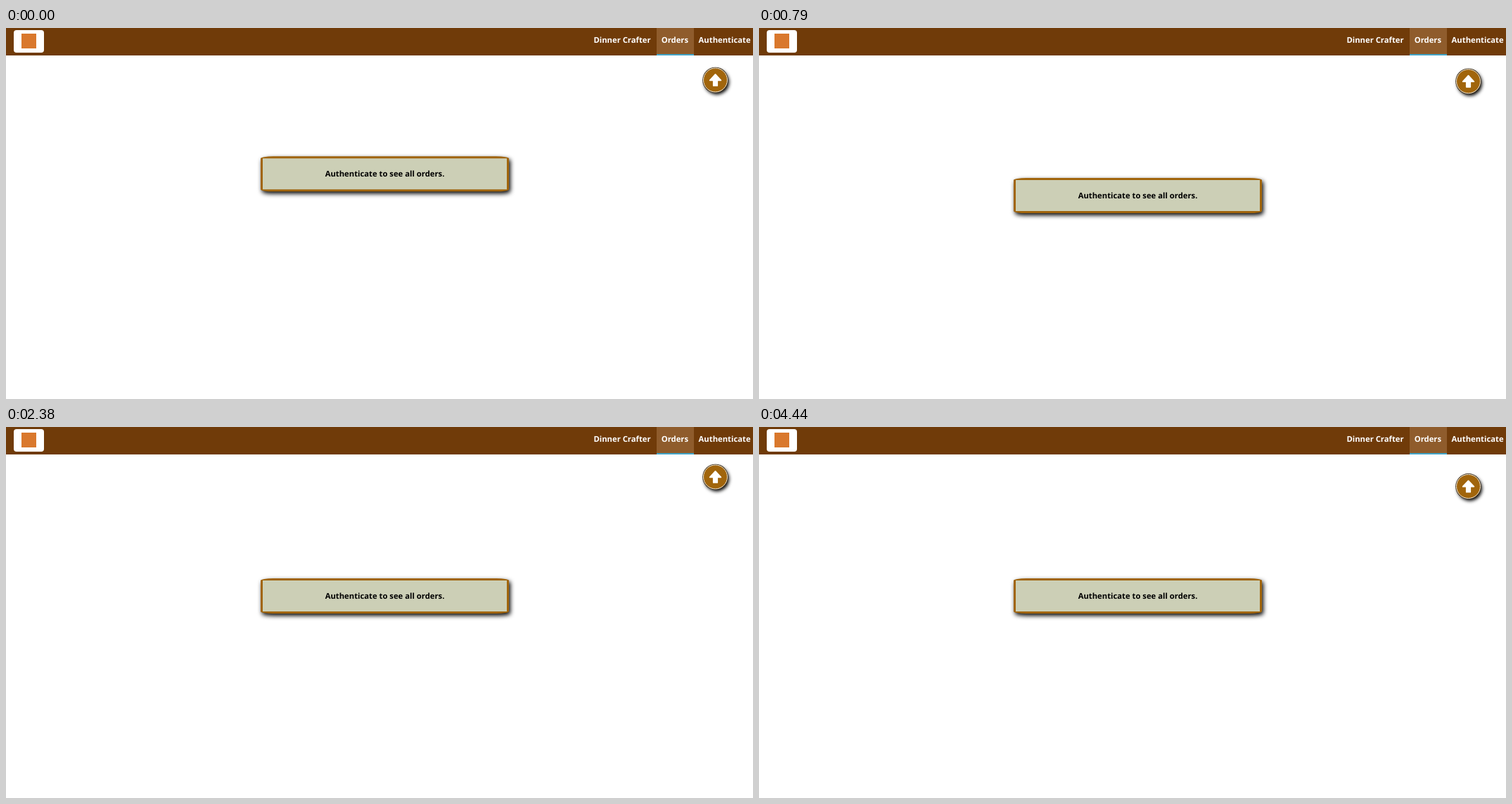
These frames come from a looping animation (1062 by 527 pixels, 4.48 s). An HTML page:

```html
<!DOCTYPE html>
<html lang="en">
<head>
<meta charset="utf-8">
<title>Orders</title>
<style>
  html, body { margin: 0; width: 100%; height: 100%; overflow: hidden; background: #fff; }
  body { position: relative; font: 700 11.27px "Open Sans", sans-serif; text-rendering: geometricPrecision; }
  header, .logo, .mark, nav span, .active, .card, .up { position: absolute; box-sizing: border-box; }
  header { left: 0; top: 0; width: 1062px; height: 39px; background: #703b09; }
  .logo { left: 11px; top: 3px; width: 43px; height: 31.5px; border-radius: 4px; background: #fff; }
  .mark { left: 11px; top: 5px; width: 21px; height: 21px; background: #d9782d; }
  .active { left: 925px; top: 0; width: 53px; height: 39px; background: #8f5c2c; border-bottom: 2px solid #40a4c8; }
  nav span { top: 0; line-height: 36px; color: #fff; white-space: nowrap; }
  .card {
    left: 362px; top: 215px; width: 353px; height: 50px;
    border: 3px solid #a1650c; border-radius: 18px / 3px; background: #cccfb6;
    box-shadow: 2px 3px 6px #000; color: #000; text-align: center; line-height: 45px;
  }
  .up {
    left: 991px; top: -17.5px; width: 35px; height: 35px;
    border: 1px solid #f4ead8; border-radius: 50%; background: #a1650c;
    box-shadow: 0 0 0 .8px #3a2a14, 2px 3px 5px #000;
  }
  .up svg { position: absolute; left: 0; top: 0; }
</style>
</head>
<body>
<header>
  <div class="logo"><div class="mark"></div></div>
  <nav>
    <div class="active"></div>
    <span style="left:835.4px">Dinner Crafter</span>
    <span style="left:931.7px">Orders</span>
    <span style="left:984.6px">Authenticate</span>
  </nav>
</header>
<div class="card">Authenticate to see all orders.</div>
<div class="up">
  <svg width="33" height="33" viewBox="-16.5 -16.5 33 33">
    <path d="M0-8 7.8.3H2.7V8H-2.7V.3H-7.8Z" fill="#fff" stroke="#fff" stroke-width="1.8" stroke-linejoin="round"/>
  </svg>
</div>
<script>
  const LOOP = 4480, SWING = 670, PHASE = 0.18, TOP = 69.8, TRAVEL = 14.4;
  const SLIDE = 980, DROP = 32.7;
  const card = document.querySelector('.card'), up = document.querySelector('.up');

  // CSS "ease", cubic-bezier(.25, .1, .25, 1), solved by bisection
  const bezier = (a, b, s) => 3 * a * s * (1 - s) ** 2 + 3 * b * s * s * (1 - s) + s ** 3;
  function ease(x) {
    let lo = 0, hi = 1;
    for (let i = 0; i < 20; i++) {
      const mid = (lo + hi) / 2;
      if (bezier(0.25, 0.25, mid) < x) lo = mid; else hi = mid;
    }
    return bezier(0.1, 1, lo);
  }

  function buttonY(t) {
    const swings = t / SWING + PHASE, n = Math.floor(swings);
    const p = ease(swings - n);
    return TOP + TRAVEL * (n % 2 ? 1 - p : p);
  }

  function cardOffset(t) {
    const left = Math.max(0, 1 - t / SLIDE);
    return -DROP * left * left * (1.68 - 0.68 * left);
  }

  const moveY = (el, y) => { el.style.transform = `translateY(${y.toFixed(2)}px)`; };

  function draw(now) {
    const t = now % LOOP;
    moveY(card, cardOffset(t));
    moveY(up, buttonY(t));
  }

  const start = performance.now();
  function tick() {
    draw(performance.now() - start);
    requestAnimationFrame(tick);
  }
  tick();
</script>
</body>
</html>
```
